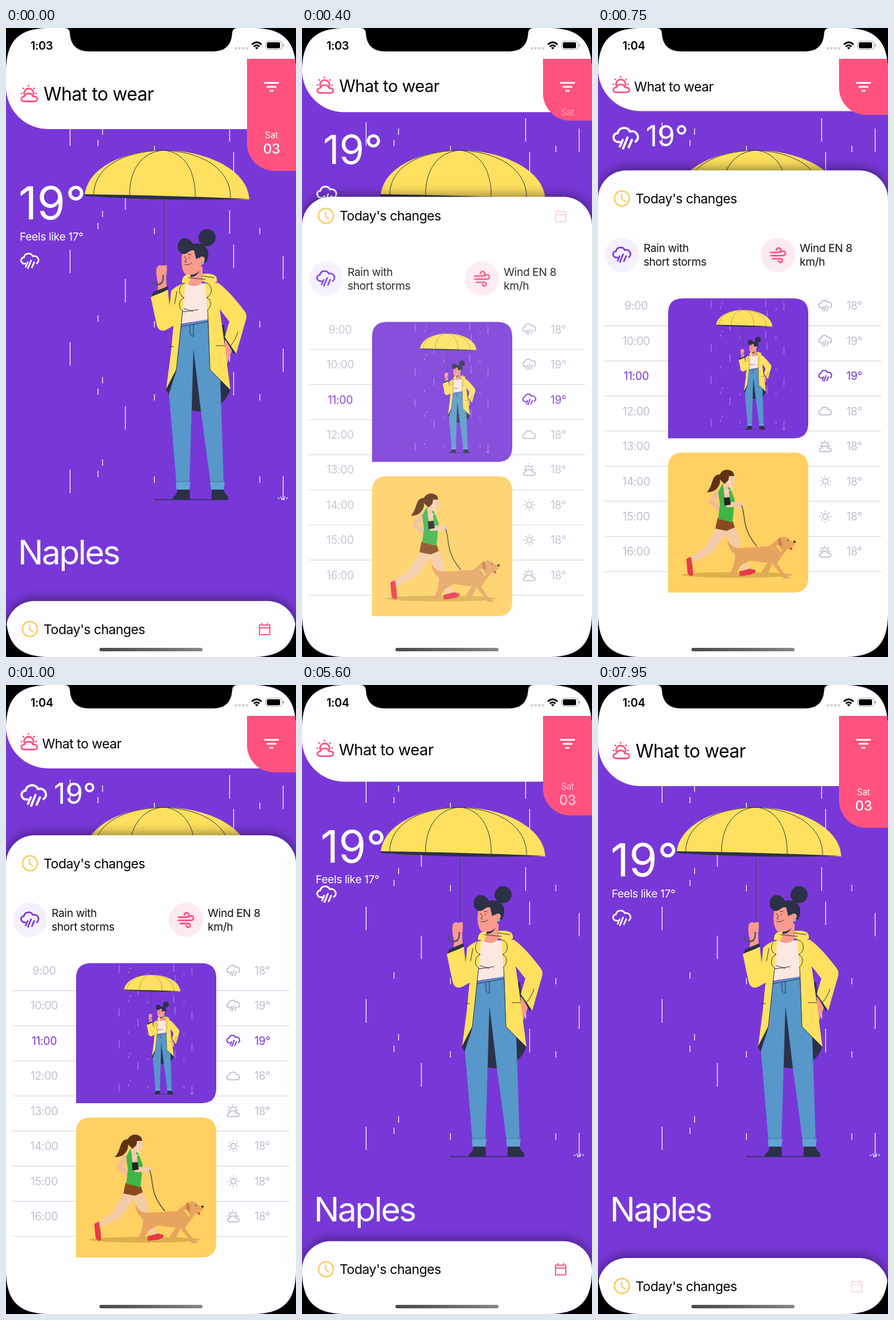
An HTML page that plays this animation: 509 px wide and 1101 px high, repeating every 8000 ms.

```html
<!DOCTYPE html>
<html lang="en">
<head>
<meta charset="utf-8">
<title>What to wear</title>
<style>
  html, body { margin: 0; width: 100%; height: 100%; overflow: hidden; background: #000; }
  #stage { display: block; width: 100vw; height: 100vh; }
  text { font-family: Inter, "Open Sans", sans-serif; letter-spacing: -.02em; }
  #temp { letter-spacing: 0; }
  #city { letter-spacing: -.045em; }
  .icon { fill: none; stroke-width: 2.8; stroke-linecap: round; stroke-linejoin: round; }
  .ink { fill: none; stroke: #2b3147; stroke-width: 1; stroke-linecap: round; }
  #sheetBack { filter: drop-shadow(0 -3px 10px rgba(0, 0, 0, .45)); }
</style>
</head>
<body>
<svg id="stage" viewBox="0 0 509 1101">
  <defs>
    <clipPath id="screen"><path d="M0 78C0 22 22 0 78 0H431C487 0 509 22 509 78V1023C509 1079 487 1101 431 1101H78C22 1101 0 1079 0 1023Z"/></clipPath>
    <path id="card" d="M0 245V26Q0 0 26 0H220Q246 0 246 26V219Q246 245 220 245Z"/>
    <clipPath id="cardClip"><use href="#card" x="123" y="224"/></clipPath>
    <linearGradient id="bar"><stop stop-color="#484848"/><stop offset="1" stop-color="#858585"/></linearGradient>

    <g id="rain">
      <path d="M-8 4.5C-17 5.5-18-6-10.5-6.5C-9-14.5 2-15.5 5-8.5C13-11 19-1 12 4"/>
      <path d="M-4 2L-7.5 10M2-1L-3.500 12.500M7.500 2L3.500 11"/>
    </g>
    <path id="cloud" d="M-9 9C-17 9-18-2-10.500-2.500C-8-11 4-12 7-3.500C17-4 17 9 9 9Z"/>
    <g id="mixed">
      <path d="M-8 13C-16 13-16 5-9 4.500C-7-2 4-3 6.500 4.500C16 4 16 13 9 13Z"/>
      <path d="M-9 1A8.300 8.300 0 1 1 7 1M-1.500-14.500v.5M-11-10l.5.5M8.500-10l-.5.5M-14-1h.5M12-1h-.5"/>
    </g>
    <g id="sun">
      <circle r="6.500"/>
      <path d="M0-13v1M0 13v-1M-13 0h1M13 0h-1M-9-9l.7.7M9-9l-.7.7M-9 9l.7-.7M9 9l-.7-.7"/>
    </g>
    <path id="wind" d="M-13-4.500H1a4 4 0 1 0-4-4M-13 1H9a4 4 0 1 0-3.500-6M-10 6.500H4a3.300 3.300 0 1 1-3.300 3.500"/>

    <g id="scene">
      <path id="drops" stroke="#fff" stroke-width="1.3"/>
      <path d="M477 822l3 2M482 820l2 4M490 820l-2 4M495 822l-3 2M483 825h6" stroke="#fff" stroke-width="1.3"/>
      <!-- umbrella -->
      <path d="M277 298V418" stroke="#4d5262" stroke-width="2"/>
      <path d="M138 293C143 242 212 214 277 214C348 214 424 246 427 300Z" fill="#ffe15f"/>
      <path d="M138 291Q282 293 427 299Q282 304 138 294Z" fill="#2b3147"/>
      <path class="ink" d="M277 214C200 216 155 246 154 291M277 214C238 216 216 250 217 292M277 214C316 217 333 255 332 295M277 214C352 217 395 252 394 297"/>
      <!-- legs -->
      <path d="M300 520H383L393 635C386 655 366 669 345 671C320 672 292 660 281 633Z" fill="#2b3147"/>
      <path d="M306 520L354 510L358 590L376 612L382 796H359L342 670L329 562L322 796H299L286 640L299 600Z" fill="#5797ca"/>
      <path d="M298 794H324L322 808H299ZM358 794H384L382 808H360Z" fill="#62a3d5"/>
      <path class="ink" d="M298 794H324M358 794H384" opacity=".4"/>
      <path d="M301 808H322L323 826H293V821Q300 818 301 808ZM361 808H382Q384 815 390 820V826H361Z" fill="#2b3147"/>
      <path d="M260 825.500H390" stroke="#2b3147" stroke-width="1.400"/>
      <!-- hands -->
      <path d="M264 421Q267 413 273 416L282 415Q283 428 281 434L282 460L266 464L267 447Q263 434 264 421Z" fill="#f99b8c"/>
      <path d="M276 432Q277 449 266 449Q256 448 256 439" fill="none" stroke="#4d5262" stroke-width="2.500"/>
      <path d="M384 545L397 563L388 588L384 585Z" fill="#f99b8c"/>
      <path d="M255 470L259 462L284 452V460ZM383 541L387 537L404 565L400 571Z" fill="#2b3147"/>
      <!-- coat and shirt -->
      <path d="M314 447H351L355 510L307 518Z" fill="#fbe8df"/>
      <path d="M254 471L284 458L287 486L290 460Q298 451 315 446L307 518L299 598L281 633L289 572L294 521L280 529Q269 532 265 522Z" fill="#ffe15f"/>
      <path d="M350 447L372 446Q391 459 419 496Q424 502 421 511L404 570L384 541L392 514L375 492L384 556L394 634L358 598L355 510Z" fill="#ffe15f"/>
      <path d="M309 446C308 428 327 429 341 431Q373 426 370 444L357 453L347 443L325 449Z" fill="#ffe15f"/>
      <path d="M322 418H345V444Q337 456 319 449L324 440Z" fill="#f99b8c"/>
      <path class="ink" d="M314 447C302 448 301 468 313 472C302 475 302 492 310 495M350 446C363 448 364 467 352 472C362 475 360 490 354 493M310 497L337 493M312 491L328 496M320 437L350 440M344 434L365 437M300 461L296 483M257 468Q270 465 283 458M287 557L294 558M369 556H384M407 532Q403 546 394 556M307 523L354 514M323 521V536L329 540V519M310 495L299 598L281 633M354 493L358 598L394 634"/>
      <!-- head -->
      <circle cx="353" cy="367" r="15" fill="#2b3147"/>
      <path d="M312 386C306 400 307 425 315 431Q325 436 342 422L346 395L330 380Z" fill="#f99b8c"/>
      <path d="M301 383C302 364 321 363 328 378C343 374 357 383 355 399Q353 412 346 414L344 403Q336 401 334 405L330 389C320 388 318 398 309 395Q302 392 301 383Z" fill="#2b3147"/>
      <circle cx="344" cy="405" r="5" fill="#f99b8c"/>
      <circle cx="345" cy="411" r="3" fill="#8fb0bd"/>
      <path d="M324 432Q333 432 340 425Q334 436 324 436Z" fill="#2b3147"/>
      <path class="ink" d="M314 400v2M322 401v2M311 395l4-1M320 396l5 1M317 403l-3 6 3 1M314 414Q321 416 326 411"/>
    </g>

    <g id="runner">
      <ellipse cx="244" cy="971" rx="97" ry="5" fill="#dcb14b"/>
      <path d="M213 823L199 843L214 856" fill="none" stroke="#f0bd98" stroke-width="9" stroke-linejoin="round"/>
      <path d="M209 886L229 894L201 932L166 949L160 942L188 921Z" fill="#f5cba7"/>
      <path d="M221 890L239 886Q255 911 248 925L267 964L256 967L235 929Z" fill="#f5cba7"/>
      <path d="M155 943L163 939L166 956L167 971Q160 976 157 966ZM248 965L267 960L277 963Q277 969 266 971L249 973Z" fill="#e8394a"/>
      <path d="M210 871L237 878L240 888L226 894L206 890Z" fill="#8b4a1d"/>
      <path d="M218 812L232 819L240 840L236 879L211 873L214 848L211 826Z" fill="#3fb449"/>
      <path d="M219 804H231L236 817L220 819Z" fill="#f5cba7"/>
      <path d="M225 822L228 848L251 848" fill="none" stroke="#f5cba7" stroke-width="9" stroke-linejoin="round" stroke-linecap="round"/>
      <path d="M221 836L231 835L233 848L222 850Z" fill="#222"/>
      <path d="M224 794H238L241 804L238 814L227 815Z" fill="#f5cba7"/>
      <path d="M239 798C239 785 219 783 214 795C198 795 203 815 191 826C207 828 216 813 214 804L222 812L229 805L230 798Z" fill="#5f3214"/>
      <path d="M231 804Q228 815 237 819L226 827" fill="none" stroke="#fff" stroke-width="1"/>
      <path d="M252 849C260 870 251 888 279 921" fill="none" stroke="#59553c" stroke-width="1.600"/>
      <path d="M227 909Q233 924 251 924L300 921L317 907Q330 900 338 911L347 913Q347 921 334 924L323 938L314 951L328 970L338 977L326 977L306 951L298 969L286 967L298 950L266 946L250 955L239 974H230L238 955L241 936Q227 924 227 909Z" fill="#e7a45f"/>
      <path d="M317 906Q324 907 323 922L316 917Z" fill="#c78245"/>
      <path d="M314 919L322 930" stroke="#f8d95e" stroke-width="3"/>
      <path d="M334 924L341 923L340 928Z" fill="#e8394a"/>
      <circle cx="345" cy="913" r="2" fill="#473022"/>
      <circle cx="333" cy="911" r="1" fill="#473022"/>
    </g>
  </defs>

  <g clip-path="url(#screen)">
    <rect width="509" height="1101" fill="#7838d8"/>
    <use href="#scene"/>
    <g fill="#fff">
      <text id="temp">19°</text>
      <text id="feels" x="24" font-size="19.300">Feels like 17°</text>
      <text id="city" x="21" y="939" font-size="59">Naples</text>
    </g>
    <use id="tempIcon" class="icon" href="#rain" stroke="#fff"/>

    <g id="sheet">
      <rect id="sheetBack" width="509" height="1300" rx="50" fill="#fefdff"/>
      <g id="sheetTitle">
        <g class="icon" stroke="#f8d066">
          <circle cx="42" cy="0" r="13"/>
          <path d="M41.500-7V1L47 5" stroke-width="2.400"/>
        </g>
        <text x="66" y="8.500" font-size="23">Today's changes</text>
        <path id="calendar" class="icon" stroke="#ff527f" style="stroke-width:2" d="M445-7H463V10H445ZM445-2H463M449-10v3M459-10v3"/>
      </g>
      <g id="list">
        <circle cx="42" cy="148" r="30" fill="#f5f0fe"/>
        <circle cx="316" cy="148" r="30" fill="#fdeaf1"/>
        <use class="icon" href="#rain" x="42" y="148" stroke="#7838d8"/>
        <use class="icon" href="#wind" x="316" y="148" stroke="#ff527f"/>
        <g font-size="19.300" fill="#111">
          <text x="80" y="143">Rain with</text><text x="80" y="167">short storms</text>
          <text x="354" y="143">Wind EN 8</text><text x="354" y="167">km/h</text>
        </g>
        <g id="rows" font-size="19.500"></g>
        <use href="#card" x="123" y="224" fill="#7838d8"/>
        <g clip-path="url(#cardClip)"><use href="#scene" transform="translate(160 170.800) scale(.342)"/></g>
        <use href="#card" x="123" y="494" fill="#ffd062"/>
        <use href="#runner" y="-263"/>
      </g>
    </g>

    <rect id="header" width="700" height="400" rx="74" fill="#fefdff"/>
    <use id="titleIcon" class="icon" href="#mixed" stroke="#ff527f"/>
    <text id="title">What to wear</text>
    <svg id="tab" x="423" y="54" width="86">
      <rect id="tabBack" width="300" height="400" rx="48" fill="#ff527f"/>
      <path d="M30 42H56M34.500 49H51.500M39.500 56H46.500" stroke="#fff" stroke-width="3"/>
      <g id="date" fill="#fff" text-anchor="middle">
        <text x="43" y="139" font-size="15.500">Sat</text>
        <text x="43" y="166" font-size="24" font-weight="500">03</text>
      </g>
    </svg>

    <text id="clock" x="43" y="37.500" font-size="20" font-weight="600"></text>
    <path d="M403.500 35.500h20" stroke="#cfcdd2" stroke-width="4.600" stroke-linecap="round" stroke-dasharray="0 6.500"/>
    <g fill="none" stroke="#000">
      <path d="M431.500 29Q440 21 448.500 29M435 32.500Q440 28 445 32.500" stroke-width="3"/>
      <path d="M437 34.500Q440 32.500 443 34.500L440 37.500Z" fill="#000" stroke="none"/>
      <rect x="456" y="23" width="28.500" height="14.500" rx="4" stroke="#aaa" stroke-width="1.200"/>
      <rect x="458" y="25" width="23" height="10.500" rx="2.500" fill="#000" stroke="none"/>
      <path d="M487 28v4.500" stroke="#aaa" stroke-width="2"/>
    </g>
    <path d="M102 0Q112 0 112 9Q114 41 146 41H363Q395 41 397 9Q397 0 407 0Z"/>
    <rect x="164" y="1085" width="181" height="6" rx="3" fill="url(#bar)"/>
  </g>
</svg>
<script>
const $ = id => document.getElementById(id);
const set = (id, attrs) => { for (const k in attrs) $(id).setAttribute(k, attrs[k]); };

// Rain: column x -> tops of its drops
const longDrops = { 112: [165, 388, 550, 773], 209: [277, 439, 662], 392: [158, 319, 543], 399: [217, 379, 602], 486: [176, 399, 561, 784] };
const shortDrops = { 161: [196, 341, 503, 631, 775], 169: [176, 320, 611, 755], 260: [206, 350, 513, 641, 785], 445: [206, 350, 513, 641, 785] };
const lines = (columns, length) => Object.entries(columns)
  .map(([x, tops]) => tops.map(y => `M${x}.5 ${y}v${length}`).join('')).join('');
set('drops', { d: lines(longDrops, 41) + lines(shortDrops, 11) });

const forecast = [['rain', 18], ['rain', 19], ['rain', 19], ['cloud', 18], ['mixed', 18], ['sun', 18], ['sun', 18], ['mixed', 18]];
$('rows').innerHTML = forecast.map(([icon, degrees], i) => {
  const y = 237 + 61.45 * i, color = i === 2 ? '#7838d8' : '#c3c1ca';
  return `<path d="M12 ${y + 35}H497" stroke="#dddbe3" stroke-width="1.4"/>
    <g fill="${color}"><text x="67" y="${y + 7}" text-anchor="middle">${9 + i}:00</text>
    <text x="436" y="${y + 7}">${degrees}°</text></g>
    <use class="icon" href="#${icon}" transform="translate(399 ${y}) scale(.73)" stroke="${color}"/>`;
}).join('');

const mix = (a, b, p) => a + (b - a) * p;
const linear = (t, start, length) => Math.min(1, Math.max(0, (t - start) / length));
const smooth = (t, start, length) => { const p = linear(t, start, length); return p * p * (3 - 2 * p); };

const makeSpring = (freq, damping) => ms => {
  if (ms <= 0) return 0;
  const t = ms / 1000, root = Math.sqrt(1 - damping ** 2), a = freq * root * t;
  return 1 - Math.exp(-damping * freq * t) * (Math.cos(a) + damping / root * Math.sin(a));
};
const bouncy = makeSpring(9.7, .62), firm = makeSpring(11.3, .75);

// 0 = sheet down, 1 = sheet up
function springState(t, spring, openStart, closeStart) {
  if (t < 150 || t >= 6050) return 0;
  if (t < 1000) return spring(t - openStart);
  return t < 5400 ? 1 : 1 - spring(t - closeStart);
}

function draw(time) {
  const t = time < 5400 ? Math.min(time, 1000) : time;
  const sheet = springState(t, bouncy, 129, 5327);
  const head = springState(t, bouncy, 129, 5400);
  const tab = springState(t, firm, 150, 5400);
  const titleSize = smooth(t, 250, 400) - smooth(t, 5400, 400);
  const tempSize = smooth(t, 250, 400) - smooth(t, 5265, 400);
  const tempMove = smooth(t, 250, 470) - smooth(t, 5305, 400);
  const appear = linear(t, 5360, 200);

  const headerBottom = 177 - 31 * head, headerMid = (54 + headerBottom) / 2;
  set('header', { y: headerBottom - 400 });
  set('titleIcon', { transform: `translate(41 ${headerMid})` });
  const size = mix(32, 23, titleSize);
  set('title', { x: mix(66, 63.5, titleSize), y: headerMid + 3 * titleSize + .36 * size, 'font-size': size });

  const tabHeight = 196 - 97 * tab;
  set('tab', { height: tabHeight });
  set('tabBack', { y: tabHeight - 400 });
  set('date', {
    transform: `translate(0 ${-44 * tab})`,
    opacity: 1 - linear(t, 300, 180) + linear(t, 5500, 150)
  });

  const lift = 97 * tab;
  set('temp', { x: mix(22, 84, tempMove), y: 335 - lift - 30 * tempSize, 'font-size': mix(80, 50, tempSize) });
  set('feels', { y: 372 - lift - 44 * tempSize, opacity: 1 - linear(t, 250, 130) + appear });
  set('tempIcon', {
    transform: `translate(${mix(42, 49, tempMove)} ${408 - lift - 117 * tempMove}) scale(${mix(1, 1.4, tempMove)})`
  });

  const listFade = t < 5400 ? linear(t, 250, 170) : 0;
  const dip = 17 * Math.sin(Math.PI * linear(t, 150, 400));
  set('sheet', { transform: `translate(0 ${1003 - 740 * sheet})` });
  set('sheetTitle', { transform: `translate(0 ${49 - dip})` });
  set('list', { transform: `translate(0 ${-42 * (1 - listFade)})`, opacity: listFade });
  const calendarDim = time >= 7950 ? .8 : time >= 7850 ? .4 : 0;
  set('calendar', { opacity: 1 - linear(t, 250, 200) + appear - calendarDim });
  $('clock').textContent = time < 750 ? '1:03' : '1:04';
}

const start = performance.now();
function tick() {
  const elapsed = (performance.now() - start) % 8000;
  draw(Math.floor(elapsed / 50) * 50);
  requestAnimationFrame(tick);
}
tick();
</script>
</body>
</html>
```
